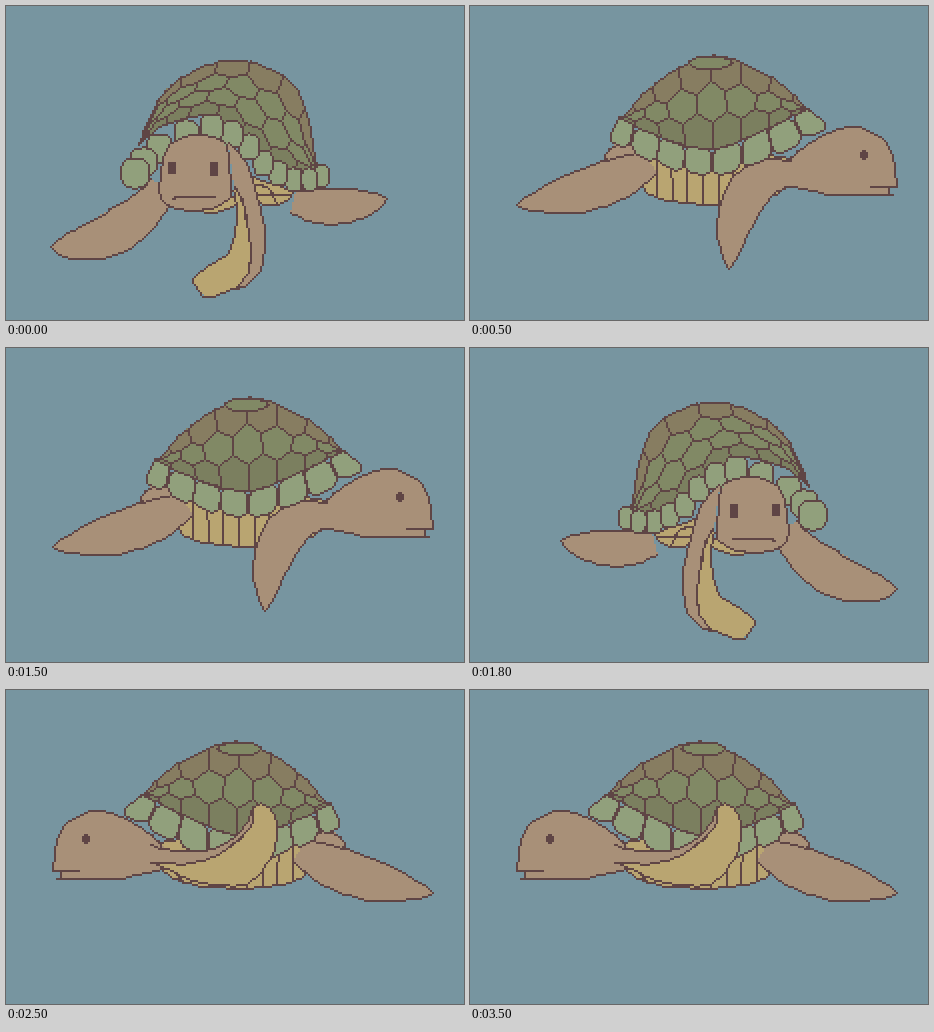
Animation, 458 px wide and 314 px high, one loop 3600 ms. Source, as an HTML page with a canvas:

```html
<!DOCTYPE html>
<html lang="en">
<head>
<meta charset="utf-8">
<title>Swimming turtle</title>
<style>
html, body { margin: 0; height: 100%; overflow: hidden; background: #7795a0; }
canvas { display: block; width: 458px; height: 314px; image-rendering: pixelated; }
</style>
</head>
<body>
<canvas id="stage" width="229" height="157"></canvas>
<script>
const ctx = document.getElementById('stage').getContext('2d');
const WATER = '#7795a0', LINE = '#5f4545', SKIN = '#a89078', RIM = '#91a07c', BELLY = '#b9a571';
const DARK = '#7b7f5f', MID = '#818965', TOP = '#877d61';

const mix = (a, b, t) => a + (b - a) * t;
const lerp = (a, b, t) => [mix(a[0], b[0], t), mix(a[1], b[1], t)];
const range = n => [...Array(n).keys()];

// Points come as x, y, x, y ... in stage pixels; the art grid is half that size.
const pairs = a => range(a.length / 2).map(i => [a[2 * i], a[2 * i + 1]]);

// Spline through the points, evaluated at u = 0..1.
function spline(a, closed) {
  const p = pairs(a), n = p.length, spans = closed ? n : n - 1;
  const at = i => p[closed ? (i + n) % n : Math.max(0, Math.min(n - 1, i))];
  return u => {
    const i = Math.min(spans - 1, Math.floor(u * spans)), t = u * spans - i;
    const [a, b, c, d] = [at(i - 1), at(i), at(i + 1), at(i + 2)];
    return [0, 1].map(k => b[k] + 0.5 * t * (c[k] - a[k] +
      t * (2 * a[k] - 5 * b[k] + 4 * c[k] - d[k] + t * (3 * (b[k] - c[k]) + d[k] - a[k]))));
  };
}
const trace = (curve, n = 60) => range(n + 1).map(i => curve(i / n));

function fill(p, color) {
  ctx.fillStyle = color;
  for (let y = 0; y < 157; y++) {
    const cuts = [], m = 2 * y + 1;
    p.forEach((a, i) => {
      const b = p[(i + 1) % p.length];
      if ((a[1] <= m) !== (b[1] <= m)) cuts.push(mix(a[0], b[0], (m - a[1]) / (b[1] - a[1])));
    });
    cuts.sort((a, b) => a - b);
    for (let i = 0; i + 1 < cuts.length; i += 2) {
      const x = Math.round(cuts[i] / 2);
      ctx.fillRect(x, y, Math.round(cuts[i + 1] / 2) - x, 1);
    }
  }
}

function stroke(p) {
  ctx.fillStyle = LINE;
  const q = p.map(v => v.map(c => Math.floor(c / 2)));
  for (let i = 0; i + 1 < q.length; i++) {
    const n = Math.max(Math.abs(q[i + 1][0] - q[i][0]), Math.abs(q[i + 1][1] - q[i][1]), 1);
    for (let k = 0; k <= n; k++) ctx.fillRect(...lerp(q[i], q[i + 1], k / n).map(Math.round), 1, 1);
  }
}

function paint(color, p) {
  fill(p, color);
  stroke(p);
}
const blob = (color, ...a) => paint(color, trace(spline(a, true), a.length * 3));
const open = (color, ...a) => paint(color, trace(spline(a), a.length * 3));
const line = (...a) => stroke(trace(spline(a)));
function dot(x, y, w, h) {
  ctx.fillStyle = LINE;
  ctx.fillRect(x / 2, y / 2, w / 2, h / 2);
}
function shifted(rows, paintPart) {
  ctx.save();
  ctx.translate(0, rows);
  paintPart();
  ctx.restore();
}

// Leaf along a bent spine from root to tip, left open at the root.
function flipper(x0, y0, cx, cy, x1, y1, width, sharp = 0.5) {
  const sides = [[], []];
  for (const i of range(25)) {
    const t = i / 24, a = lerp([x0, y0], [cx, cy], t), b = lerp([cx, cy], [x1, y1], t);
    const [x, y] = lerp(a, b, t), len = Math.hypot(b[0] - a[0], b[1] - a[1]);
    const w = width * (0.6 + 0.4 * Math.sin(Math.PI * t)) * (1 - t ** 6) ** sharp / len;
    const dx = (b[1] - a[1]) * w, dy = (a[0] - b[0]) * w;
    sides[0].push([x + dx, y + dy]);
    sides[1].unshift([x - dx, y - dy]);
  }
  paint(SKIN, sides.flat());
}

// Honeycomb of plates stretched between the lower and the upper edge of the shell.
function dome(base, top, cols, colors) {
  const low = spline(base), high = spline(top), rows = colors.length;
  const at = (k, r) => {
    const zig = r % rows ? ((k + r) % 2 ? -0.17 : 0.17) : 0;
    const u = k / (2 * cols);
    return lerp(low(u), high(u), (r + zig) / rows);
  };
  const edge = r => r === 0 ? trace(low) : r === rows ? trace(high) : range(2 * cols + 1).map(k => at(k, r));
  colors.forEach((c, r) => fill([...edge(r), ...edge(r + 1).reverse()], c));
  for (const r of range(rows + 1)) {
    stroke(edge(r));
    if (r === rows) break;
    for (const k of range(2 * cols)) if (k && (k + r) % 2 === 0) stroke([at(k, r), at(k, r + 1)]);
  }
}

// Rounded plates strung along a curve, shrinking from one size to another.
function lumps(n, curve, w0, h0, w1, h1) {
  const path = spline(curve);
  for (const i of range(n).reverse()) {
    const t = i / (n - 1), [x, y] = path(t), w = mix(w0, w1, t), h = mix(h0, h1, t);
    paint(RIM, trace(u => {
      const a = u * 2 * Math.PI, round = v => Math.sign(v) * Math.abs(v) ** 0.7;
      return [x + w * round(Math.cos(a)), y + h * round(Math.sin(a))];
    }, 24));
  }
}

// Blocky plates with cut corners between two curves.
function plates(n, inner, outer) {
  const a = spline(inner), b = spline(outer);
  for (const i of range(n)) {
    const at = (u, v) => lerp(a((i + u) / n), b((i + u) / n), v);
    const l = 0.03, r = 0.97;
    paint(RIM, [at(0.15, 0), at(0.85, 0), at(r, 0.2), at(r, 0.8), at(0.75, 1), at(0.25, 1),
      at(l, 0.8), at(l, 0.2), at(0.15, 0)]);
  }
}

// Control point, tip and width of the front flipper in each beat of a stroke.
const STROKE = [[262, 165, 259, 262, 21], [262, 168, 199, 212, 16], null,
  [262, 158, 302, 291, 20], [260, 165, 275, 283, 20]];
const BOB = [0, 1, 1, -1, -2], KICK = [0, 1, 2, 1, 0];

function side(beat) {
  blob(BELLY, 176, 152, 170, 176, 186, 191, 230, 198, 285, 195, 316, 180, 312, 150);
  for (const x of range(6).map(i => 186 + i * 15.5)) line(x, 150, x + 1, Math.min(197, 189 + (x - 186) / 3));
  line(310, 176, 297, 192);
  shifted(KICK[beat], () => {
    blob(SKIN, 134, 152, 150, 137, 178, 148, 150, 154);
    flipper(180, 156, 135, 185, 47, 199, 22, 0.75);
  });

  blob(SKIN, 316, 158, 335, 140, 358, 127, 385, 121, 411, 131, 422, 150, 427, 178, 427, 180, 419, 181,
    419, 188, 419, 188, 362, 189, 340, 184, 316, 178);
  line(400, 181, 426, 181);
  dot(392, 144, 4, 10);
  dot(390, 146, 8, 6);

  const rim = [148, 111, 190, 131, 243, 143, 298, 122, 338, 102];
  shifted(BOB[beat], () => {
    dome(rim, [152, 113, 182, 80, 240, 50, 300, 70, 338, 104], 8, [DARK, MID, TOP]);
    blob(MID, 219, 56, 230, 51, 251, 51, 262, 56, 251, 62, 228, 62);
    plates(8, rim, [138, 133, 186, 157, 242, 170, 304, 151, 359, 120]);
  });

  if (STROKE[beat]) return flipper(320, 168, ...STROKE[beat]);
  // Raised flipper, showing its underside.
  const inner = [227, 119, 229, 137, 244, 152, 264, 166, 294, 174, 326, 172];
  open(SKIN, 329, 155, 309, 160, 274, 160, 249, 150, 234, 135, ...inner);
  open(BELLY, 328, 172, 294, 188, 269, 194, 234, 194, 210, 170, 203, 140, 208, 122, 218, 114, ...inner);
}

function front(late) {
  flipper(287, 196, 325, 206, 380, 193, 18);
  blob(BELLY, 240, 170, 262, 176, 286, 187, 272, 198, 248, 194);
  line(246, 178, 262, 182, 270, 196);
  line(246, 188, 262, 188, 284, 188);
  blob(BELLY, 188, 198, 225, 190, 232, 198, 205, 207);
  flipper(157, 180, 120, 240, late ? 60 : 45, late ? 234 : 241, 22);

  dome([133, 139, 160, 118, 210, 112, 258, 155, 312, 166], [133, 137, 162, 82, 228, 54, 290, 83, 312, 166],
    8, [DARK, MID, MID, TOP]);
  lumps(12, [129, 167, 150, 145, 198, 122, 235, 134, 262, 161, 290, 174, 316, 170], 14, 15, 7, 11);

  const near = a => late ? a.map((v, i) => i % 2 ? mix(170, v, 0.92) : mix(235, v, 0.8)) : a;
  const inner = [230, 281, 242, 265, 244, 240, 237, 198, 228, 182];
  open(SKIN, ...near([222, 136, 242, 160, 255, 205, 259, 230, 255, 262, 240, 279, ...inner]));
  blob(BELLY, ...near([...inner, 231, 210, 222, 246, 195, 265, 187, 277, 203, 291]));
  blob(SKIN, 155, 170, 160, 143, 180, 130, 205, 130, 220, 141, 224, 170, 224, 190, 205, 203, 170, 203, 154, 190);
  line(166, 193, 176, 191, 208, 191);
  dot(162, 156, 8, 12);
  dot(204, 156, 8, 14);
}

function quarter() {
  dome([168, 103, 215, 103, 270, 126, 320, 148, 349, 154], [168, 102, 190, 80, 240, 58, 305, 75, 349, 154],
    7, [DARK, MID, MID, TOP]);
  blob(BELLY, 163, 195, 190, 180, 230, 180, 283, 209, 265, 220, 218, 220, 180, 212);
  line(166, 201, 200, 202, 228, 188);
  line(178, 210, 220, 208, 246, 194);
  line(200, 216, 240, 213, 262, 203);
  line(232, 219, 274, 207);
  blob(SKIN, 87, 192, 87, 162, 104, 132, 130, 126, 152, 131, 210, 124, 310, 156, 352, 188, 388, 214, 355, 219,
    283, 209, 245, 191, 213, 179, 190, 181, 140, 205, 92, 197);
  line(207, 160, 255, 157, 290, 162, 335, 175, 352, 188);
  line(152, 131, 163, 143, 168, 163);
  line(90, 193, 130, 193, 136, 188);
  lumps(10, [159, 118, 213, 116, 268, 131, 322, 150, 354, 171], 12, 16, 9, 18);
  dot(124, 156, 6, 8);
}

function draw(now) {
  const step = Math.floor(now / 100) % 36, beat = step % 18;
  // The second half of the loop mirrors the first.
  const flip = (step >= 18) !== (beat === 1 || beat === 2);
  ctx.setTransform(1, 0, 0, 1, 0, 0);
  ctx.fillStyle = WATER;
  ctx.fillRect(0, 0, 229, 157);
  if (flip) ctx.setTransform(-1, 0, 0, 1, beat < 2 ? 236 : 237, 0);
  if (beat < 2) front(beat === 1);
  else if (beat === 2) quarter();
  else side(beat % 5);
}

const start = performance.now();
function tick() {
  draw(performance.now() - start);
  requestAnimationFrame(tick);
}
tick();
</script>
</body>
</html>
```
